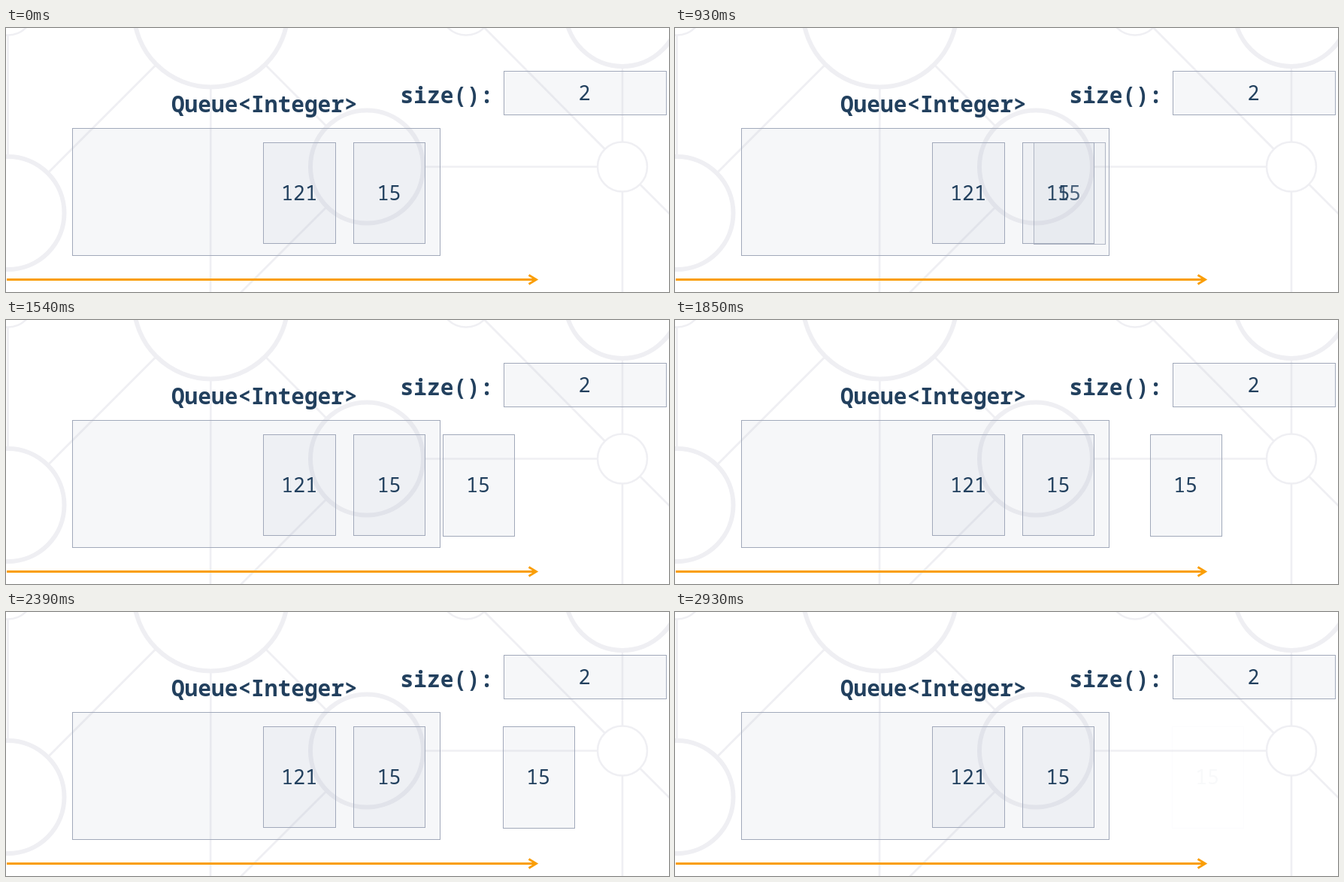
An HTML page with a canvas for the animation above (3.17 s loop, 882x351 px).

```html
<!DOCTYPE html>
<html lang="en">
<head>
<meta charset="utf-8">
<title>Queue peek</title>
<style>
html, body { margin: 0; width: 100%; height: 100%; overflow: hidden; background: #fff; }
canvas { display: block; }
</style>
</head>
<body>
<canvas id="stage" width="882" height="351"></canvas>
<script>
const ctx = document.getElementById('stage').getContext('2d');
const LOOP = 3170, START = 540, FPS = 13, LAST = 31;
const INK = '#22405e', EDGE = '#a1a9ba', FILL = 'rgba(170, 178, 195, 0.1)';
const NET = '#efeff3', ORANGE = '#fa9e06';
const MONO = '"Noto Sans Mono", "DejaVu Sans Mono", monospace';

const node = (x, y, r) => ({ x, y, r });
const crown = node(272.5, -24, 102.5);
const left = node(2.5, 246, 75);
const hub = node(480, 184.5, 75);
const right = node(820, -25, 76);
const small = node(820, 184.5, 33);
const top1 = node(2.5, -25, 34.5);
const top2 = node(612, -25, 34.5);
const low1 = node(272, 392, 34.5);
const low2 = node(820, 392, 34.5);
const low3 = node(1028, 392, 34.5);
const nodes = [crown, left, hub, right, small, top1, top2, low1, low2, low3];
const links = [
  [top1, left], [crown, left], [crown, hub], [crown, low1], [hub, low1],
  [hub, small], [top2, small], [right, small], [small, low2], [small, low3]
];

const clamp = v => Math.max(0, Math.min(1, v));
const ease = u => u < 0.5 ? 2 * u * u : 1 - 2 * (1 - u) * (1 - u);

function line(points, color, width) {
  ctx.strokeStyle = color;
  ctx.lineWidth = width;
  ctx.beginPath();
  points.forEach(p => ctx.lineTo(p.x, p.y));
  ctx.stroke();
}

function box(x, y, w, h) {
  ctx.fillStyle = FILL;
  ctx.fillRect(x, y, w + 1, h + 1);
  ctx.strokeStyle = EDGE;
  ctx.lineWidth = 1;
  ctx.strokeRect(x + 0.5, y + 0.5, w, h);
}

function label(text, x, y, font) {
  ctx.font = font + ' ' + MONO;
  ctx.textAlign = 'center';
  ctx.fillStyle = INK;
  ctx.fillText(text, x, y);
}

const digits = (text, x, y) => label(text, x, y, '26.8px');
const heading = (text, x, y) => label(text, x, y, 'bold 29.5px');

function drawNet() {
  links.forEach(ends => line(ends, NET, 2.7));
  nodes.forEach(({ x, y, r }) => {
    ctx.lineWidth = r > 50 ? 6 : 2.5;
    ctx.fillStyle = '#fff';
    ctx.beginPath();
    ctx.arc(x, y, r, 0, Math.PI * 2);
    ctx.fill();
    ctx.stroke();
  });
}

function drawArrow(tip, y) {
  const wing = dy => ({ x: tip - 10, y: y + dy });
  const end = { x: tip, y };
  line([{ x: 1, y }, end], ORANGE, 2.8);
  line([wing(-6), end, wing(6)], ORANGE, 2.8);
}

function drawQueue() {
  heading('Queue<Integer>', 343.8, 112);
  heading('size():', 586.5, 100);
  box(662, 57, 216, 58);
  digits('2', 769.5, 96);
  box(88, 133, 489, 169);
  box(342, 152, 96, 134);
  digits('121', 390, 229);
  box(462, 152, 95, 134);
  digits('15', 509.5, 229);
  drawArrow(705.5, 334.5);
}

// The peeked element fades in, slides out of the queue and fades away.
function drawCopy(step) {
  const x = Math.round(463 + 198 * ease(clamp((step - 0.8) / 22.2)));
  ctx.globalAlpha = clamp((step + 0.3) / 6.6) * clamp((LAST + 0.2 - step) / 6.6);
  box(x, 152, 95, 135);
  digits('15', x + 47, 229);
  ctx.globalAlpha = 1;
}

function draw(t) {
  ctx.fillStyle = '#fff';
  ctx.fillRect(0, 0, 882, 351);
  drawNet();
  drawQueue();
  const tick = Math.floor(t / 10) * 10;
  const step = Math.floor((tick - START) * FPS / 1000);
  if (step >= 0) drawCopy(Math.min(step, LAST));
}

const begin = performance.now();
function loop() {
  draw((performance.now() - begin) % LOOP);
  requestAnimationFrame(loop);
}
loop();
</script>
</body>
</html>
```
